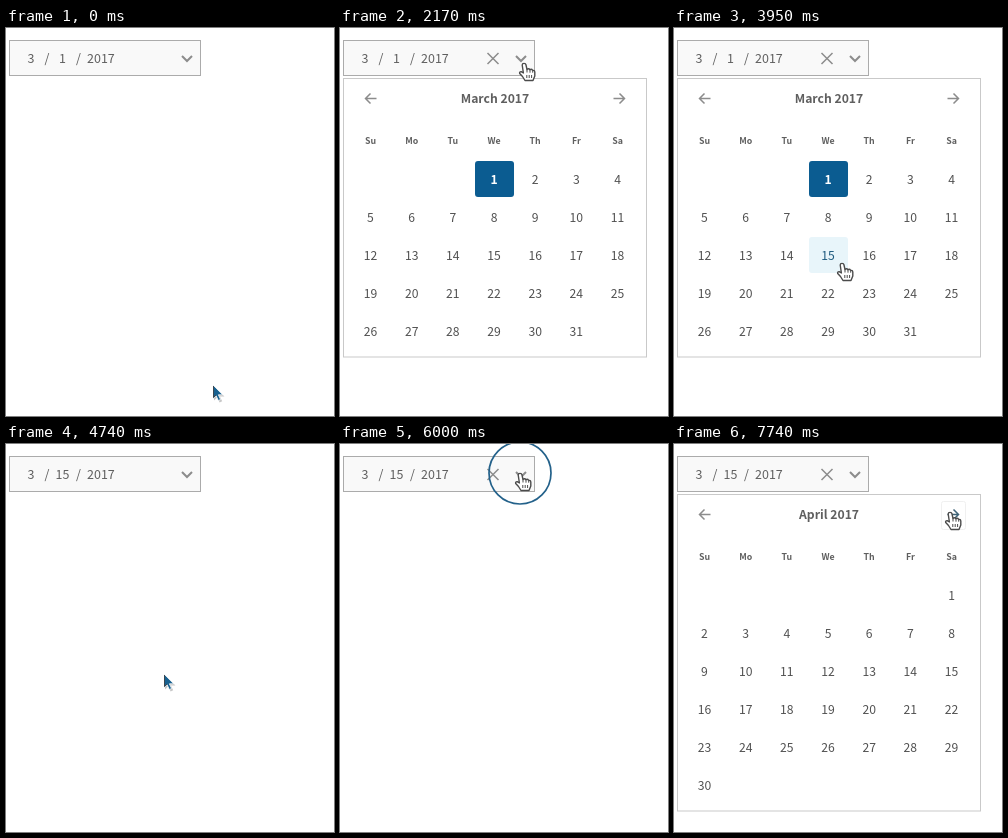
Write an HTML page that moves like this. It is 328 by 388 pixels and loops after 8 s.

```html
<!DOCTYPE html>
<html lang="en">
<head>
<meta charset="utf-8">
<title>Date picker</title>
<style>
  html, body { margin: 0; width: 100%; height: 100%; overflow: hidden; background: #fff; }
  svg { display: block; width: 328px; height: 388px; }
  text { font: 12.5px "Noto Sans CJK JP", "Noto Sans CJK SC", "Noto Sans CJK", "Open Sans", sans-serif; fill: #5f5f5f; }
  .mid text, .mid { text-anchor: middle; }
  .title { font-weight: 700; font-size: 12.2px; }
  .week { font-weight: 700; font-size: 8.8px; }
  .day { font-weight: 500; font-size: 12.2px; fill: #505050; }
  .day.on { font-weight: 700; fill: #fff; }
  .day.over { fill: #1d5a7e; }
  .icon { fill: none; stroke: #8c8c8c; stroke-width: 1.5; }
</style>
</head>
<body>
<svg viewBox="0 0 328 388">
  <rect x="3.5" y="12.5" width="191" height="35" fill="#f9f9f9" stroke="#ababab"/>
  <text x="21.5" y="35">3</text>
  <text x="38.5" y="35">/</text>
  <text id="dayField" class="mid" x="56.5" y="35">1</text>
  <text x="70" y="35">/</text>
  <text x="81" y="35">2017</text>
  <path id="clear" class="icon" d="M147.5 25l11 11m0-11l-11 11"/>
  <path class="icon" style="stroke-width:2" d="M176 28l5 5 5-5"/>
  <g id="panel" class="mid">
    <rect id="frame" x="3.5" y="50.5" width="303" fill="#fff" stroke="#c9c9c9"/>
    <path class="icon" d="M36.5 70.5h-11m5-5l-5 5 5 5"/>
    <g id="next">
      <rect id="nextBox" x="267.5" y="57.5" width="24" height="28" rx="2" fill="#fff" stroke="#f0f0f0"/>
      <path id="nextIcon" class="icon" d="M273.5 70.5h11m-5-5l5 5-5 5"/>
    </g>
    <text id="title" class="title" x="155" y="75"></text>
    <g id="days"></g>
  </g>
  <circle id="ring" fill="none" stroke="#23618a" stroke-width="1.7"/>
  <g id="arrow">
    <path d="M1 1.5v14l3.3-3 2.3 5 2.6-1.2-2.3-4.8h4.6z" fill="#000" opacity=".22"/>
    <path d="M0 0v13.6l3.1-2.9 2.2 4.8 2.3-1-2.2-4.7h4.3z" fill="#17608f" stroke="#fff" stroke-width=".8"/>
    <path d="M.5 1v11.500l2.600-2.500" fill="none" stroke="#3b4650" stroke-width="1"/>
  </g>
  <g id="hand" stroke="#4b4b4b" stroke-width="1.4" stroke-linejoin="round">
    <path fill="#fff" d="M-1.800 2Q-1.800 .4 0 .4T2 2L3 6.500Q4.500 5 6 6.700Q7.500 5.700 8.700 7.400Q10.500 7 10.800 9V13L9 17.500H1L-1.500 13.500-4.300 10.500Q-4.800 8.600-2.800 8.700L-.6 10z"/>
    <path fill="none" d="M3 6.500v3M6 6.700v3M8.700 7.400v2.300M2.800 12v3M5.200 12v3M7.600 12v3" stroke-width="1"/>
  </g>
</svg>
<script>
const LOOP = 8000, FADE = 120, RING_TIME = 125;
const WEEKDAYS = ['Su', 'Mo', 'Tu', 'We', 'Th', 'Fr', 'Sa'];
const MONTHS = { 2: 'March', 3: 'April' };
const START = [207, 357];

// from, to, x, y, optional control point of a curve
const MOVES = [
  [40, 550, 183, 32],
  [1690, 2170, 184, 35],
  [2430, 2910, 133, 42],
  [3130, 3910, 168, 235, 85, 110],
  [4200, 4740, 158, 230],
  [5040, 5820, 180, 29],
  [6740, 7270, 276, 68]
];
const CLICKS = [560, 3990, 5905, 7310];
const OPEN = [[700, 4150], [6050, LOOP]];
const PICK_TIME = 4110, NEXT_TIME = 7450;

const ui = {};
document.querySelectorAll('[id]').forEach(el => ui[el.id] = el);
const show = (el, on) => el.style.display = on ? '' : 'none';
const clamp = u => Math.min(1, Math.max(0, u));
const ease = u => u * u * (3 - 2 * u);
const inside = ([x, y], left, top, width, height) =>
  x >= left && x <= left + width && y >= top && y <= top + height;
const columnX = i => 30.5 + 41.17 * i;
const rowY = i => 151 + 38 * i;

function pointerAt(t) {
  let [x, y] = START;
  for (const [from, to, x1, y1, cx = (x + x1) / 2, cy = (y + y1) / 2] of MOVES) {
    if (t < from) break;
    const u = ease(clamp((t - from) / (to - from))), v = 1 - u;
    x = v * v * x + 2 * u * v * cx + u * u * x1;
    y = v * v * y + 2 * u * v * cy + u * u * y1;
  }
  return [x, y];
}

function monthCells(month) {
  const first = new Date(2017, month, 1).getDay();
  const count = new Date(2017, month + 1, 0).getDate();
  return Array.from({ length: count }, (_, i) => ({
    day: i + 1,
    x: columnX((first + i) % 7),
    y: rowY(Math.floor((first + i) / 7))
  }));
}

let drawn = '';
function drawMonth(month, cells, selected, hovered) {
  const key = [month, selected, hovered].join();
  if (key === drawn) return;
  drawn = key;
  ui.title.textContent = MONTHS[month] + ' 2017';
  ui.frame.setAttribute('height', cells[cells.length - 1].y - 25 + (month === 2 ? 0.5 : 0.5));
  const heads = WEEKDAYS.map((name, i) => `<text class="week" x="${columnX(i)}" y="116">${name}</text>`);
  const days = cells.map(({ day, x, y }) => {
    const state = day === selected ? 'on' : day === hovered ? 'over' : '';
    const fill = state === 'on' ? '#0b5c91' : '#e8f5fa';
    const box = state ? `<rect x="${x - 19}" y="${y - 18}" width="39" height="36" rx="3" fill="${fill}"/>` : '';
    return `${box}<text class="day ${state}" x="${x}" y="${y + 4.5}">${day}</text>`;
  });
  ui.days.innerHTML = heads.concat(days).join('');
}

function render(t) {
  const point = pointerAt(t);
  const span = OPEN.find(([from, to]) => t >= from && t < to);
  const picked = t >= PICK_TIME ? 15 : 1;
  const month = t >= NEXT_TIME ? 3 : 2;
  const cells = monthCells(month);
  const target = span && cells.find(c => inside(point, c.x - 19, c.y - 18, 39, 36));
  const overNext = !!span && inside(point, 267, 57, 25, 29);
  const overField = inside(point, 3, 12, 192, 36);

  ui.dayField.textContent = picked;
  show(ui.clear, span || overField);
  show(ui.panel, span);
  if (span) {
    ui.panel.style.opacity = clamp((t - span[0]) / FADE);
    drawMonth(month, cells, month === 2 ? picked : 0, target ? target.day : 0);
    show(ui.nextBox, overNext);
    ui.nextIcon.style.stroke = overNext ? '#3f6478' : '';
  }

  const click = CLICKS.find(c => t >= c && t < c + RING_TIME);
  show(ui.ring, click !== undefined);
  if (click !== undefined) {
    ui.ring.setAttribute('cx', point[0]);
    ui.ring.setAttribute('cy', point[1]);
    ui.ring.setAttribute('r', 8 + 23 * clamp((t - click) / 90));
  }

  const isHand = target || overNext || (overField && point[0] > 166);
  show(ui.hand, isHand);
  show(ui.arrow, !isHand);
  (isHand ? ui.hand : ui.arrow).setAttribute('transform', `translate(${point})`);
}

const begin = performance.now();
function tick() {
  render((performance.now() - begin) % LOOP);
  requestAnimationFrame(tick);
}
render(0);
tick();
</script>
</body>
</html>
```
